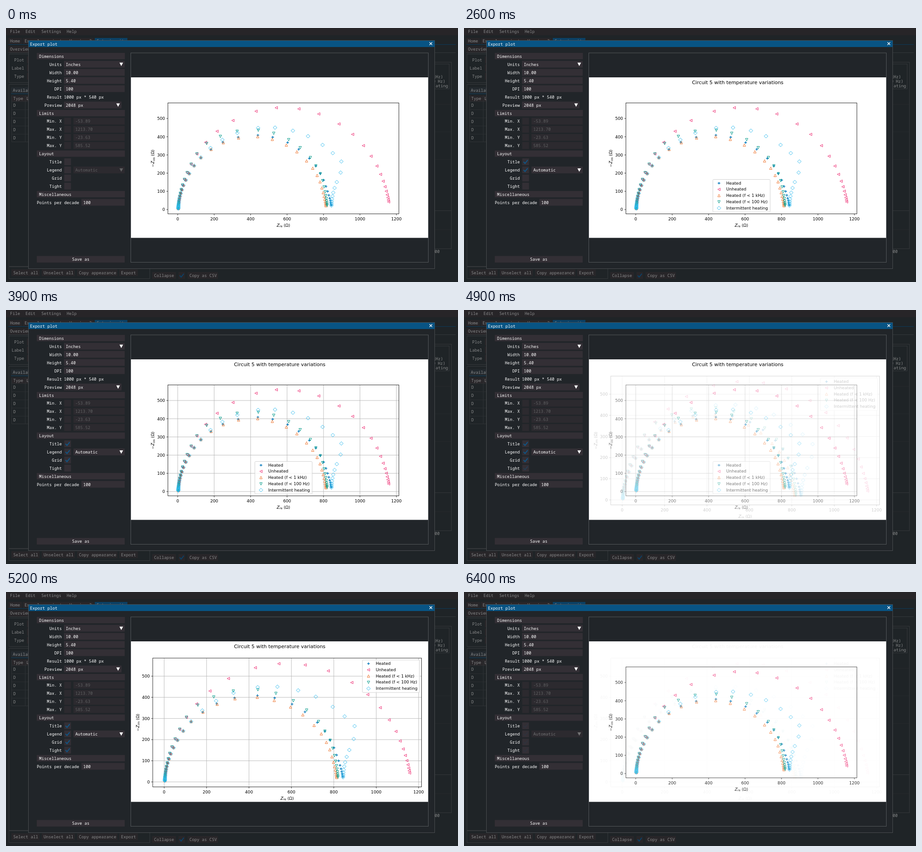
Write an HTML page that moves like this. It is 998 by 561 pixels and loops after 6500 ms.

```html
<!DOCTYPE html>
<html lang="en">
<head>
<meta charset="utf-8">
<title>Export plot</title>
<style>
  html, body { margin: 0; width: 100%; height: 100%; overflow: hidden; background: #1f2427; }
  svg { display: block; width: 998px; height: 561px; }
  .ui { font: 9.167px "Noto Sans Mono", "DejaVu Sans Mono", monospace; fill: #fff; white-space: pre; }
  .back { fill: #8a8b8c; }
  .plot { font: 9.11px "DejaVu Sans", sans-serif; fill: #000; white-space: pre; }
</style>
</head>
<body>
<svg id="stage" viewBox="0 0 998 561" xmlns="http://www.w3.org/2000/svg"></svg>
<script>
const FIELD = '#332f35', DIM = '#2c2a2f', BLUE = '#0f5687';

const rect = (x, y, w, h, fill, extra = '') =>
  `<rect x="${x}" y="${y}" width="${w}" height="${h}" fill="${fill}" ${extra}/>`;
const frame = (x, y, w, h, color) => rect(x, y, w, h, 'none', `stroke="${color}"`);
const path = (d, color, width = 1, extra = '') =>
  `<path d="${d}" fill="none" stroke="${color}" stroke-width="${width}" ${extra}/>`;
const text = (x, y, s, extra = '') => `<text x="${x}" y="${y}" ${extra}>${s.replace(/</g, '&lt;')}</text>`;
const group = (id, body, extra = '') => `<g id="${id}" ${extra}>${body}</g>`;
const END = 'text-anchor="end"', MID = 'text-anchor="middle"';

// Dimmed window behind the dialog
function backdrop() {
  const btn = '#282629', line = '#35383b';
  const label = (x, y, s, extra = '') => text(x, y, s, 'class="ui back" ' + extra);
  const button = (x, y, w, s) => rect(x, y, w, 15, btn) + label(x + 4, y + 11, s);
  let out = rect(0, 0, 998, 561, '#1f2427') + rect(0, 0, 998, 16, '#272528');
  [['File', 9], ['Edit', 43], ['Settings', 78], ['Help', 134]].forEach(([s, x]) => out += label(x, 11, s));
  out += rect(5, 22, 30, 14, btn) + rect(37, 22, 156, 14, btn) + rect(196, 22, 72, 14, '#0b4166');
  out += label(9, 32, 'Home') + label(41, 32, 'Example project - Version 2') + label(200, 32, 'Set circuit');
  out += path('M5 36.5H993', '#0b3a59');
  out += rect(5, 40, 48, 14, btn) + label(9, 50, 'Overview') + path('M5 54.5H993', line);
  out += frame(6.5, 57.5, 310, 63, line) + frame(6.5, 124.5, 310, 402, line);
  ['Plot', 'Label', 'Type'].forEach((s, i) => {
    out += label(40, 74 + 18 * i, s, END) + rect(46, 63 + 18 * i, 10, 15, btn);
  });
  out += rect(11, 131, 60, 14, '#242a2f') + label(15, 141, 'Available') + path('M11 145.5H60', '#0b3a59');
  out += rect(12, 149, 50, 13, btn) + label(16, 158.5, 'Type') + label(45, 158.5, 'L');
  for (let i = 0; i < 5; i++) out += label(16, 174 + 18 * i, 'D') + path(`M12 ${162.5 + 18 * i}H60`, '#2b2e31');
  out += path('M12.5 149V251.5H60M42.5 149V251', '#2f3235');
  out += frame(6.5, 527.5, 311, 26, line);
  out += button(12, 533, 62, 'Select all') + button(79, 533, 73, 'Unselect all');
  out += button(157, 533, 89, 'Copy appearance') + button(250, 533, 41, 'Export');
  out += button(323, 539, 52, 'Collapse') + rect(381, 539, 14, 15, btn) + check(388, 546.5, '#0b4166');
  out += button(401, 539, 67, 'Copy as CSV');
  out += frame(320.5, 75.5, 663, 412, line) + frame(860.5, 79.5, 118, 55, line);
  out += path('M947 403.5H983', line) + path('M947 168.5H983M947 229.5H983M947 290.5H983M947 445.5H983', '#25292c');
  out += label(965, 111, 'kHz)', END) + label(970, 121, '0 Hz)', END) + label(976, 131, 'ating', END);
  return out + label(957.5, 497, '800', END);
}

function check(x, y, color = BLUE) {
  return path(`M${x - 4.5} ${y}l3.2 3.6 6-7.4`, color, 2);
}
const arrow = (x, y, fill) => `<path d="M${x - 4} ${y - 3.5}h8l-4 7.5Z" fill="${fill}"/>`;

function dialog() {
  const label = (y, s) => text(123.2, y + 3.5, s, 'class="ui" ' + END);
  const value = (x, y, w, s, on = true) => rect(x, y - 7.5, w, 15, on ? FIELD : DIM) +
    text(x + 4, y + 3.5, s, `class="ui" ${on ? '' : 'style="fill:#626264"'}`);
  const box = (y, fill = FIELD) => rect(128.5, y - 7.5, 15, 15, fill);
  const head = (y, s) => rect(68, y - 7, 194.5, 14, FIELD) + text(73, y + 3.5, s, 'class="ui"');

  let out = rect(49.5, 27.5, 897, 504, '#212529', 'stroke="#4a4d50"') + rect(50, 28, 896.5, 14, '#085484');
  out += text(53, 38.5, 'Export plot', 'class="ui"') + path('M935 31.5l6 6m0-6l-6 6', '#fff', 1.2);
  [[62, 'Dimensions'], [188, 'Limits'], [277.5, 'Layout'], [367, 'Miscellaneous']].forEach(h => out += head(...h));

  [['Units', 'Inches'], ['Width', '10.00'], ['Height', '5.40'], ['DPI', '100']].forEach(([s, v], i) => {
    const y = 80 + 18 * i;
    out += label(y, s) + value(128, y, 134, v);
  });
  out += arrow(254.5, 80, '#fff');
  out += label(152, 'Result') + text(128, 155.5, '1000 px * 540 px', 'class="ui"');
  out += label(170, 'Preview') + value(128, 170, 127, '2048 px') + arrow(247.5, 170, '#fff');

  [['Min. X', '-53.89'], ['Max. X', '1213.70'], ['Min. Y', '-23.63'], ['Max. Y', '585.52']].forEach(([s, v], i) => {
    const y = 205.8 + 17.9 * i;
    out += label(y, s) + box(y, DIM) + value(149, y, 113, v, false);
  });
  out += value(149, 313.5, 113, 'Automatic', false) + arrow(254.5, 313.5, '#626264');
  out += group('combo', value(149, 313.5, 113, 'Automatic') + arrow(254.5, 313.5, '#fff'));
  ['Title', 'Legend', 'Grid', 'Tight'].forEach((s, i) => {
    const y = 295.5 + 17.9 * i;
    out += label(y, s) + box(y) + group('check' + i, check(136, y));
  });
  out += text(68, 388.5, 'Points per decade', 'class="ui"') + value(166.5, 385, 95.5, '100');
  out += rect(68, 503.5, 194, 14.5, FIELD) + text(165, 514.2, 'Save as', 'class="ui" ' + MID);
  return out + rect(276, 109, 656.5, 354.5, '#fff') + frame(275.5, 55, 657, 462.5, '#54585b');
}

// Each series: marker, arc points, then a shrinking tail [x, y, x limit, x ratio, y ratio, count]
const LOW_A = [105, 306, 3, .69, .815, 21], LOW_B = [90, 241, 3, .69, .82, 20];
const SERIES = [
  { name: 'Heated', color: '#0077bb', width: 1.4, mark: 'M-2.8 0H2.8M0-2.8V2.8', low: LOW_B,
    arc: [127, 285, 182, 330, 248, 370, 332, 397, 440, 408, 521, 397, 603, 368, 664, 331, 722, 281, 758, 239, 782, 198],
    high: [801, 161.5, 845, .71, .787, 9] },
  { name: 'Unheated', color: '#ee3377', width: 1, mark: 'M-2.9 0L2.7-2.8V2.8Z', low: LOW_A,
    arc: [153, 369, 216, 430, 303, 489, 430, 540, 541, 559, 665, 553, 774, 525, 885, 470, 960, 413, 1019, 351, 1061, 293, 1093, 239],
    high: [1113, 193.5, 1162, .71, .805, 8] },
  { name: 'Heated (f < 1 kHz)', color: '#ee7733', width: 1, mark: 'M0-2.9L2.8 2.7H-2.8Z', low: LOW_B,
    arc: [127, 285, 183, 330, 250, 367, 334, 393, 439, 400, 519, 385, 596, 354, 654, 317, 707, 267, 741, 227, 765, 187],
    high: [781, 152, 816, .71, .78, 9] },
  { name: 'Heated (f < 100 Hz)', color: '#009988', width: 1, mark: 'M0 2.9L2.8-2.7H-2.8Z', low: LOW_A,
    arc: [159, 363, 234, 402, 326, 430, 442, 436, 527, 419, 609, 384, 672, 340, 728, 286, 758, 240, 783, 197],
    high: [795, 159, 821, .68, .785, 9] },
  { name: 'Intermittent heating', color: '#33bbee', width: 1, mark: 'M0-4.1L4.1 0 0 4.1-4.1 0Z', low: LOW_B,
    arc: [127, 286, 180, 338, 245, 383, 327, 421, 441, 448, 534, 450, 632, 433, 715, 403, 795, 355, 851, 310, 898, 264, 894, 203],
    high: [873, 151, 843, .59, .785, 9] },
];

const tail = ([x, y, end, rx, ry, n]) =>
  Array.from({ length: n }, (_, k) => [end + (x - end) * rx ** k, y * ry ** k]);
function points(s) {
  const arc = [];
  for (let i = 0; i < s.arc.length; i += 2) arc.push([s.arc[i], s.arc[i + 1]]);
  return [...tail(s.low).reverse(), ...arc, ...tail(s.high)];
}
const marker = (s, x, y) =>
  path(s.mark, s.color, s.width, `transform="translate(${x.toFixed(2)} ${y.toFixed(2)})"`);

function legend(dx, dy) {
  let out = rect(549.5, 334.5, 126.5, 72, '#fff', 'rx="2" fill-opacity=".8" stroke="#ccc" stroke-width=".9"');
  SERIES.forEach((s, i) => {
    const y = 342.3 + 13.75 * i;
    out += marker(s, 563, y + .4) + text(579, y + 3.3, s.name);
  });
  return `<g transform="translate(${dx} ${dy})">${out}</g>`;
}

function plot(id, l, r, t, b, legendX, legendY) {
  const X = v => l + (v + 53.89) / 1267.6 * (r - l);
  const Y = v => b - (v + 23.63) / 609.15 * (b - t);
  let grid = '', ticks = '', labels = '', marks = '';
  for (let v = 0; v <= 1200; v += 200) {
    const x = X(v);
    grid += `M${x} ${t}V${b}`;
    ticks += `M${x} ${b}v3.3`;
    labels += text(x, b + 14.2, String(v), MID);
  }
  for (let v = 0; v <= 500; v += 100) {
    const y = Y(v);
    grid += `M${l} ${y}H${r}`;
    ticks += `M${l} ${y}h-3.3`;
    labels += text(l - 6.4, y + 3.4, String(v), END);
  }
  SERIES.forEach(s => points(s).forEach(([x, y]) => marks += marker(s, X(x), Y(y))));
  const axis = (sign, sub) => `${sign}<tspan font-style="italic">Z</tspan>` +
    `<tspan font-size="6.4" dy="1.5">${sub}</tspan><tspan dy="-1.5"> (Ω)</tspan>`;
  labels += `<text x="${(l + r) / 2}" y="${b + 28}" ${MID}>${axis('', 're')}</text>`;
  labels += `<text transform="translate(${l - 30.5} ${(t + b) / 2}) rotate(-90)" ${MID}>${axis('−', 'im')}</text>`;
  return group(id,
    group(id + 'Grid', path(grid, '#b0b0b0', .85)) + marks +
    path(ticks, '#000', .8) + rect(l, t, r - l, b - t, 'none', 'stroke="#000" stroke-width=".85"') +
    labels + group(id + 'Legend', legend(legendX, legendY)), 'class="plot"');
}

document.getElementById('stage').innerHTML = backdrop() + dialog() +
  plot('loose', 357.5, 867.5, 165.5, 410.5, 0, 0) +
  plot('tight', 324, 917.5, 146, 430.5, 237.4, -184.5) +
  group('title', text(604.4, 124, 'Circuit 5 with temperature variations', 'font-size="10.93" style="font-size:10.93px" ' + MID), 'class="plot"');

const LOOP = 6500, FIRST = 1000, EVERY = 1300;
const show = (id, o) => document.getElementById(id).setAttribute('opacity', o.toFixed(3));
const ink = w => 1 - (1 - w) ** .6;   // dark strokes fading over white
const glow = w => w ** .8;            // light strokes fading over dark

function progress(t, k) {
  const step = Math.floor((t - FIRST - EVERY * k) / 100);
  return step < 0 ? 0 : step > 2 ? 1 : .3 + .32 * step;
}

function draw(t) {
  const reset = progress(t, 4);
  const on = [0, 1, 2, 3].map(k => reset ? 1 - reset : progress(t, k));
  on.forEach((w, i) => show('check' + i, glow(w)));
  show('combo', glow(on[1]));
  show('title', ink(on[0]));
  show('looseLegend', reset ? 0 : ink(on[1]));
  show('looseGrid', reset ? 0 : ink(on[2]));
  show('loose', ink(1 - on[3]));
  show('tight', ink(on[3]));
}

const start = performance.now();
function tick() {
  draw((performance.now() - start) % LOOP);
  requestAnimationFrame(tick);
}
draw(0);
requestAnimationFrame(tick);
</script>
</body>
</html>
```
